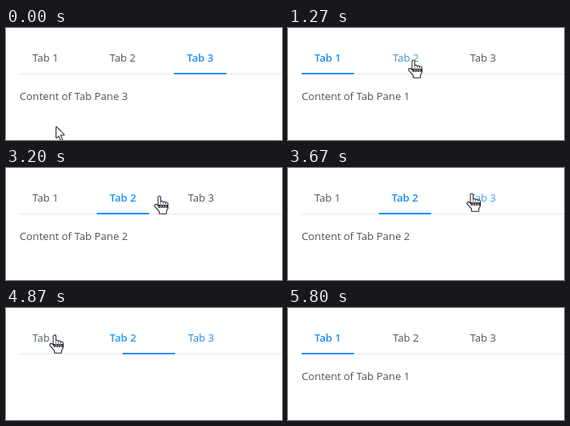
An HTML page with a canvas for the animation above (6.39 s loop, 345 by 140 pixels).

```html
<!DOCTYPE html>
<html lang="en">
<head>
<meta charset="utf-8">
<title>Tabs</title>
<style>
  html, body { margin: 0; width: 100%; height: 100%; overflow: hidden; background: #fff; }
  canvas { display: block; width: 345px; height: 140px; }
</style>
</head>
<body>
<canvas id="stage"></canvas>
<script>
const W = 345, H = 140, LOOP = 6390, STEP = 200 / 3;
const LEFT = 17, PAD = 16, PITCH = 96.5, BAR_WIDTH = 65.5, BOLD_EXTRA = 1.5;
const DARK = [82, 82, 82], BLUE = [24, 144, 255], HOVER = [64, 169, 255];
const FONT = '13.2px "Open Sans", "Noto Sans", sans-serif';
const FIRST_TAB = 2;

const canvas = document.getElementById('stage');
const ctx = canvas.getContext('2d');
const ratio = window.devicePixelRatio || 1;
canvas.width = W * ratio;
canvas.height = H * ratio;

// Where the pointer rests, and when; a click happens as it leaves.
const STOPS = [
  { at: 0, until: 60, x: 62, y: 122 },
  { at: 690, until: 785, x: 57, y: 36, tab: 0, click: true },
  { at: 1180, until: 1270, x: 156, y: 39, tab: 1 },
  { at: 1400, until: 1790, x: 151, y: 39, tab: 1 },
  { at: 1930, until: 2860, x: 147, y: 38, tab: 1, click: true },
  { at: 3510, until: 3735, x: 229, y: 31, tab: 2, click: true },
  { at: 4540, until: 4750, x: 140, y: 36, tab: 1, click: true },
  { at: 4860, until: 5260, x: 60, y: 33, tab: 0, click: true },
  { at: 5790, x: 64, y: 145 }
];
const CLICKS = STOPS.filter(stop => stop.click);

const lerp = (a, b, p) => a + (b - a) * p;
const smooth = p => p * p * (3 - 2 * p);

// The CSS "ease" curve, cubic-bezier(.25, .1, .25, 1).
function ease(x) {
  if (x <= 0) return 0;
  if (x >= 1) return 1;
  const bezier = (s, a, b) => 3 * s * (1 - s) ** 2 * a + 3 * s * s * (1 - s) * b + s ** 3;
  let low = 0, high = 1;
  for (let i = 0; i < 20; i++) {
    const mid = (low + high) / 2;
    if (bezier(mid, .25, .25) < x) low = mid; else high = mid;
  }
  return bezier(low, .1, 1);
}

const progress = (t, start) => ease((t - start) / 300);

function selection(t) {
  let state = { from: FIRST_TAB, to: FIRST_TAB, start: -1000 };
  for (const { until, tab } of CLICKS) {
    if (t >= until) state = { from: state.to, to: tab, start: until };
  }
  return state;
}

// Hovering lightens a tab, a click makes it blue, a click elsewhere darkens it.
function tabColor(index, t) {
  let active = FIRST_TAB;
  let color = index === active ? BLUE : DARK;
  const fade = (target, start) => {
    color = color.map((v, i) => lerp(v, target[i], progress(t, start)));
  };
  for (const { at, until, tab, click } of STOPS) {
    if (tab === index) fade(HOVER, at - 40);
    if (!click) continue;
    if (tab === index) fade(BLUE, until);
    else if (active === index) fade(DARK, until + 70);
    active = tab;
  }
  return `rgb(${color.map(Math.round)})`;
}

function text(label, x, y, color, bold) {
  ctx.font = (bold ? '600 ' : '400 ') + FONT;
  ctx.fillStyle = color;
  ctx.fillText(label, x, y);
}

function drawTabs(t, { from, to, start }) {
  ctx.fillStyle = '#e8e8e8';
  ctx.fillRect(LEFT, 57, W - LEFT, 1);
  const position = lerp(from, to, progress(t, start));
  ctx.fillStyle = '#1890ff';
  ctx.fillRect(LEFT + position * PITCH, 56, BAR_WIDTH, 2);
  for (let i = 0; i < 3; i++) {
    const x = LEFT + PAD + i * PITCH + (i > to ? BOLD_EXTRA : 0);
    text(`Tab ${i + 1}`, x, 42, tabColor(i, t), i === to);
  }
}

function drawPane(t, { from, to, start }) {
  const offset = (to - from) * (W - LEFT) * (1 - progress(t, start + 40));
  ctx.save();
  ctx.beginPath();
  ctx.rect(LEFT, 60, W - LEFT, 80);
  ctx.clip();
  text(`Content of Tab Pane ${to + 1}`, LEFT + offset, 90, `rgb(${DARK})`, false);
  ctx.restore();
}

function handShape() {
  const hand = new Path2D('M5.5 14.5L3.2 12Q1 11.5 1.2 13.5L7 20V22.7H15V20L17 16V12H5.5Z');
  for (let i = 0; i < 4; i++) {
    const top = i ? 6.8 + i * .9 : 1.4;
    hand.roundRect(5.5 + 3 * i, top, 2.4, 16 - top, 1.2);
  }
  return hand;
}

const HAND = handShape();
const ARROW = new Path2D('M1 2V15L4 12.5L6.6 18L8 17.3L5.7 11.6H10.4Z');

function pointerAt(t) {
  const i = STOPS.findIndex(stop => stop.at > t);
  if (i < 0) return null;
  const a = STOPS[i - 1], b = STOPS[i];
  const p = smooth(Math.max(0, (t - a.until) / (b.at - a.until)));
  return { x: Math.round(lerp(a.x, b.x, p)), y: Math.round(lerp(a.y, b.y, p)) };
}

function drawPointer(t) {
  const pointer = pointerAt(t);
  if (!pointer) return;
  const overTab = pointer.y < 58;
  const shape = overTab ? HAND : ARROW;
  ctx.save();
  ctx.translate(pointer.x - (overTab ? 6 : 0), pointer.y);
  ctx.strokeStyle = '#1c1c28';
  ctx.fillStyle = '#fff';
  ctx.lineWidth = 2;
  ctx.lineJoin = 'round';
  ctx.stroke(shape);
  ctx.fill(shape);
  ctx.restore();
}

function draw(now) {
  // The picture advances in steps, 15 per second.
  const t = Math.floor((now % LOOP + 4) / STEP) * STEP;
  const state = selection(t);
  ctx.setTransform(ratio, 0, 0, ratio, 0, 0);
  ctx.fillStyle = '#fff';
  ctx.fillRect(0, 0, W, H);
  drawTabs(t, state);
  drawPane(t, state);
  drawPointer(t);
}

const origin = performance.now();
function tick() {
  draw(performance.now() - origin);
  requestAnimationFrame(tick);
}
tick();
</script>
</body>
</html>
```
